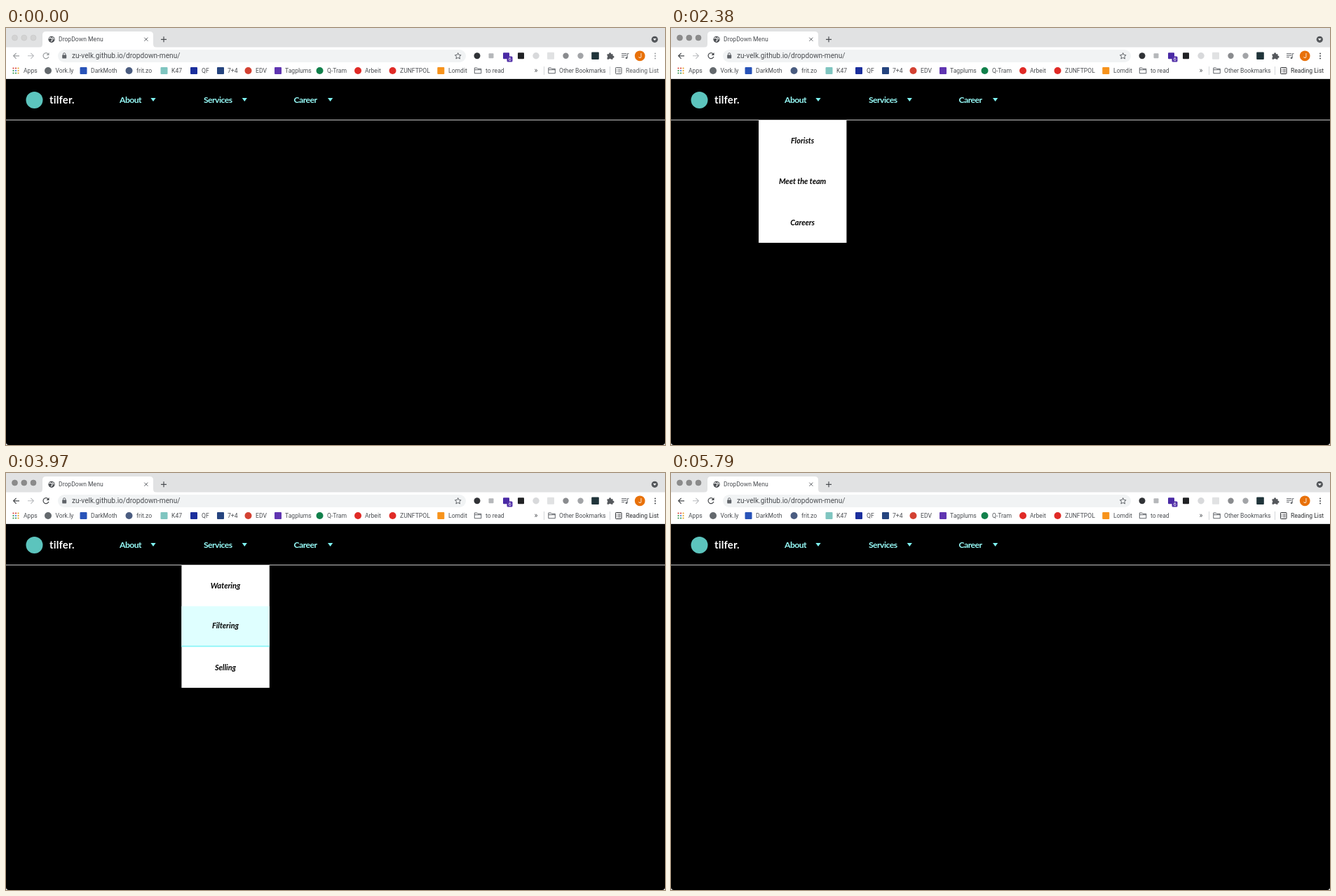
Recreate the animation shown at these times as an HTML page. Size 940 px wide and 596 px high, loop 8000 ms.

```html
<!DOCTYPE html>
<html lang="en">
<head>
<meta charset="utf-8">
<title>DropDown Menu</title>
<style>
html, body { margin: 0; width: 100%; height: 100%; overflow: hidden; background: #fff; }
svg { display: block; --dot: #d3d3d3; --rim: #c6c6c6; --ink: #9b9ea1; --label: #5c5f63; }
svg.active { --dot: #8b8b8b; --rim: #828282; --ink: #46494c; --label: #2b2d30; }
text { font: 8.6px Roboto, sans-serif; fill: #4b4e52; }
.nav { font: 700 12.2px Lato, sans-serif; letter-spacing: -.55px; fill: #97fbf8; }
.brand { font: 700 14.8px Lato, sans-serif; letter-spacing: .2px; fill: #fff; }
.item { font: italic 700 10.9px Lato, sans-serif; fill: #000; text-anchor: middle; }
.line { fill: none; stroke: #5f6368; stroke-width: 1; }
.ink { fill: none; stroke: var(--ink); stroke-width: 1.2; }
</style>
</head>
<body>
<svg id="stage" width="940" height="596" viewBox="0 0 940 596">
  <rect width="940" height="28" fill="#e1e2e3"/>
  <path d="M0 73H940V592Q940 596 936 596H4Q0 596 0 592Z"/>
  <rect y="27.5" width="940" height="45.5" fill="#fff"/>
  <path d="M0 72.5H940" stroke="#d9dadc"/>

  <!-- tab strip -->
  <g fill="var(--dot)" stroke="var(--rim)" stroke-width=".6">
    <circle cx="12.5" cy="14" r="4"/><circle cx="25.8" cy="14" r="4"/><circle cx="39" cy="14" r="4"/>
  </g>
  <path d="M47 28Q52 28 52 23V10Q52 5 57 5H205Q210 5 210 10V23Q210 28 215 28Z" fill="#fff"/>
  <circle cx="65" cy="16.3" r="4.6" fill="#505357"/>
  <path d="M61.5 15Q64 13 65.5 15.5T64 19M67 13Q66 15 68.8 16" fill="none" stroke="#fff" stroke-width="1.2"/>
  <text x="75" y="19.3">DropDown Menu</text>
  <path class="line" d="M197.3 13.7l5 5m0-5l-5 5"/>
  <path d="M225 12.3v8M221 16.3h8" stroke="#4b4e52" stroke-width="1.2"/>
  <circle cx="925.3" cy="16.3" r="4.6" fill="#55585c"/>
  <path d="M923 15h4.6l-2.3 3z" fill="#fff"/>

  <!-- toolbar -->
  <path class="ink" d="M19 39.8h-8.4m4-4l-4 4l4 4"/>
  <path d="M31 39.8h8.4m-4-4l4 4l-4 4" fill="none" stroke="#b9bbbe" stroke-width="1.1"/>
  <path class="ink" d="M60.2 37.2A4 4 0 1 0 60.9 40.8"/>
  <path d="M61.5 35v4h-4z" fill="var(--ink)"/>
  <rect x="74" y="31" width="582" height="18" rx="9" fill="#f1f3f4"/>
  <rect x="80.2" y="38.5" width="6" height="5" rx=".7" fill="#5f6368"/>
  <path class="line" d="M81.5 39v-1.6a1.7 1.7 0 0 1 3.4 0V39"/>
  <text x="94" y="43.2" style="font-size:10.1px">zu-velk.github.io/dropdown-menu/</text>
  <path class="line" d="M644.7 35.6l1.3 2.9l3.1.3l-2.3 2.1l.7 3.1l-2.8-1.6l-2.8 1.6l.7-3.1l-2.3-2.1l3.1-.3z"/>
  <g id="extensions"></g>
  <rect x="714.5" y="40.5" width="8" height="8" rx="1.5" fill="#5230a8"/>
  <text x="716.7" y="47.2" style="font-size:7px;fill:#fff">6</text>
  <path d="M857.5 37.2h2.6a1.5 1.5 0 1 1 2.9 0h2.6v2.6a1.5 1.5 0 1 1 0 2.9v2.1h-2.7a1.5 1.5 0 0 0-2.8 0h-2.6v-2.6a1.5 1.5 0 0 0 0-2.6z" fill="#55585c"/>
  <path class="line" d="M878 36.7h7M878 39.2h7M878 41.7h4M886.2 42.7v-6h2.3"/>
  <circle cx="885" cy="42.8" r="1.4" fill="#5f6368"/>
  <circle cx="904.2" cy="39.8" r="7.4" fill="#e8710a"/>
  <text x="902.3" y="42.8" style="fill:#fff">J</text>
  <g fill="var(--ink)"><circle cx="926" cy="36.5" r="1"/><circle cx="926" cy="40" r="1"/><circle cx="926" cy="43.5" r="1"/></g>

  <!-- bookmarks -->
  <g id="bookmarks"></g>
  <text x="753.5" y="63.8" style="font-size:10.5px">»</text>
  <path d="M767.5 55v12M861.5 55v12" stroke="#d4d6d9"/>
  <g fill="none" stroke="var(--label)">
    <rect x="869.5" y="56.5" width="8.5" height="9" rx=".8"/>
    <path d="M871 59h1m1 0h3.5M871 61h1m1 0h3.5M871 63h1m1 0h3.5" stroke-width=".8"/>
  </g>
  <text x="884" y="64" style="fill:var(--label)">Reading List</text>

  <!-- page -->
  <path d="M0 131.5H940" stroke="#c4c4c4"/>
  <circle cx="40.5" cy="103" r="12" fill="#5cc4bd"/>
  <text class="brand" x="62" y="107.5">tilfer.</text>
  <g id="nav"></g>
  <g id="menu">
    <rect y="132" width="125.4" height="175" fill="#fff"/>
    <g id="glow">
      <rect width="125.4" height="58" fill="#dfffff"/>
      <rect y="56.4" width="125.4" height="1.6" fill="#84f5f7"/>
    </g>
    <text class="item" x="62.6"></text>
    <text class="item" x="62.6"></text>
    <text class="item" x="62.6"></text>
  </g>
</svg>
<script>
const $ = id => document.getElementById(id);
const stage = $('stage'), menu = $('menu'), glow = $('glow');
const labels = [...menu.querySelectorAll('text')];

const dot = (x, y, r, fill) => `<circle cx="${x}" cy="${y}" r="${r}" fill="${fill}"/>`;
const box = (x, y, r, fill) =>
  `<rect x="${x - r}" y="${y - r}" width="${2 * r}" height="${2 * r}" rx="1" fill="${fill}"/>`;
const folder = x =>
  `<path class="line" d="M${x - 4.7} 57h3.5l1.2 1.3h4.8v6.5h-9.5zM${x - 4.7} 59.7h9.5"/>`;
const apps = x => ['#d9453d', '#d9453d', '#e9a52c', '#3f9b57', '#447fe0', '#e9a52c', '#3f9b57', '#3f9b57', '#e9a52c']
  .map((c, i) => box(x - 3.5 + i % 3 * 3.5, 57.5 + (i / 3 | 0) * 3.5, 1.1, c)).join('');

const extensions = [
  [dot, 672, 4.5, '#303236'], [box, 692, 3.5, '#b5b7ba'], [box, 713.5, 4.5, '#4a2aa5'],
  [box, 734.5, 4.5, '#202124'], [dot, 756, 4.7, '#d8d9db'], [box, 777, 5, '#e1e2e3'],
  [dot, 798.5, 4.2, '#898b8e'], [dot, 819.5, 4.2, '#a2a4a7'], [box, 840.5, 5.3, '#20343a']
];
$('extensions').innerHTML = extensions.map(([shape, x, r, c]) => shape(x, 39.8, r, c)).join('');

const bookmarks = [
  [apps, 14, 25, 'Apps'],
  [dot, 60, 70.5, 'Vork.ly', '#64696d'],
  [box, 110.5, 121, 'DarkMoth', '#2853b8'],
  [dot, 175.5, 186, 'frit.zo', '#4a5c80'],
  [box, 225.5, 236, 'K47', '#7fc5c0'],
  [box, 268, 279, 'QF', '#1b2f9d'],
  [box, 306, 316, '7+4', '#25447f'],
  [dot, 345.5, 356, 'EDV', '#d34132'],
  [box, 388, 398, 'Tagplums', '#6035b1'],
  [dot, 447.5, 458, 'Q-Tram', '#11804b'],
  [dot, 502, 512, 'Arbeit', '#e02a26'],
  [dot, 551.5, 562, 'ZUNFTPOL', '#e02a26'],
  [box, 620.3, 631, 'Lomdit', '#f7931c'],
  [folder, 673, 684, 'to read'],
  [folder, 778.5, 789, 'Other Bookmarks']
];
$('bookmarks').innerHTML = bookmarks.map(([shape, x, tx, name, c]) =>
  (c ? shape(x, 61, 5, c) : shape(x)) + `<text x="${tx}" y="64">${name}</text>`).join('');

const menus = [
  { name: 'About', x: 162, caret: 210, items: ['Florists', 'Meet the team', 'Careers'] },
  { name: 'Services', x: 282, caret: 340.3, items: ['Watering', 'Filtering', 'Selling'] },
  { name: 'Career', x: 410.5, caret: 462.6, items: ['Best picks', "Today's Picks", 'Random Picks'] }
];
$('nav').innerHTML = menus.map(m => `<text class="nav" x="${m.x}" y="106.8">${m.name}</text>
  <path d="M${m.caret - 3.6} 100h7.2l-3.6 5z" fill="#7ff5f3"/>`).join('');

// time, open menu, hovered item (-1 = none)
const steps = [
  [0, -1, -1], [600, 0, -1], [1260, 0, 0], [1620, 0, 1], [1910, 0, 2], [2260, 0, 1], [2320, 0, 0],
  [2380, 0, -1], [2720, 1, -1], [3320, 1, 0], [3500, 1, 1], [3620, 1, 2], [3970, 1, 1], [4030, 1, 0],
  [4200, 1, -1], [4370, 2, -1], [4790, 2, 0], [4880, 2, 1], [4970, 2, 2], [5440, 2, 1], [5560, 2, 0],
  [5670, 2, -1], [5790, -1, -1]
];
const FADE = 250, LOOP = 8000, ROW = 58.4;

function draw(t) {
  stage.classList.toggle('active', t >= 500);
  const [, open, hover] = steps.findLast(s => s[0] <= t);
  menu.style.display = open < 0 ? 'none' : '';
  if (open < 0) return;
  const start = steps.find(s => s[1] === open)[0];
  const p = Math.min(1, (t - start) / FADE);
  menu.setAttribute('opacity', 1 - (1 - p) ** 2);
  menu.setAttribute('transform', `translate(${125 + open * 125.4} 0)`);
  glow.style.display = hover < 0 ? 'none' : '';
  glow.setAttribute('transform', `translate(0 ${132 + Math.max(0, hover) * ROW})`);
  labels.forEach((label, i) => {
    label.textContent = menus[open].items[i];
    label.setAttribute('y', 164.8 + i * ROW - (i === hover ? 1.3 : 0));
  });
}

function tick(now) {
  draw(now % LOOP);
  requestAnimationFrame(tick);
}
draw(0);
requestAnimationFrame(tick);
</script>
</body>
</html>
```
